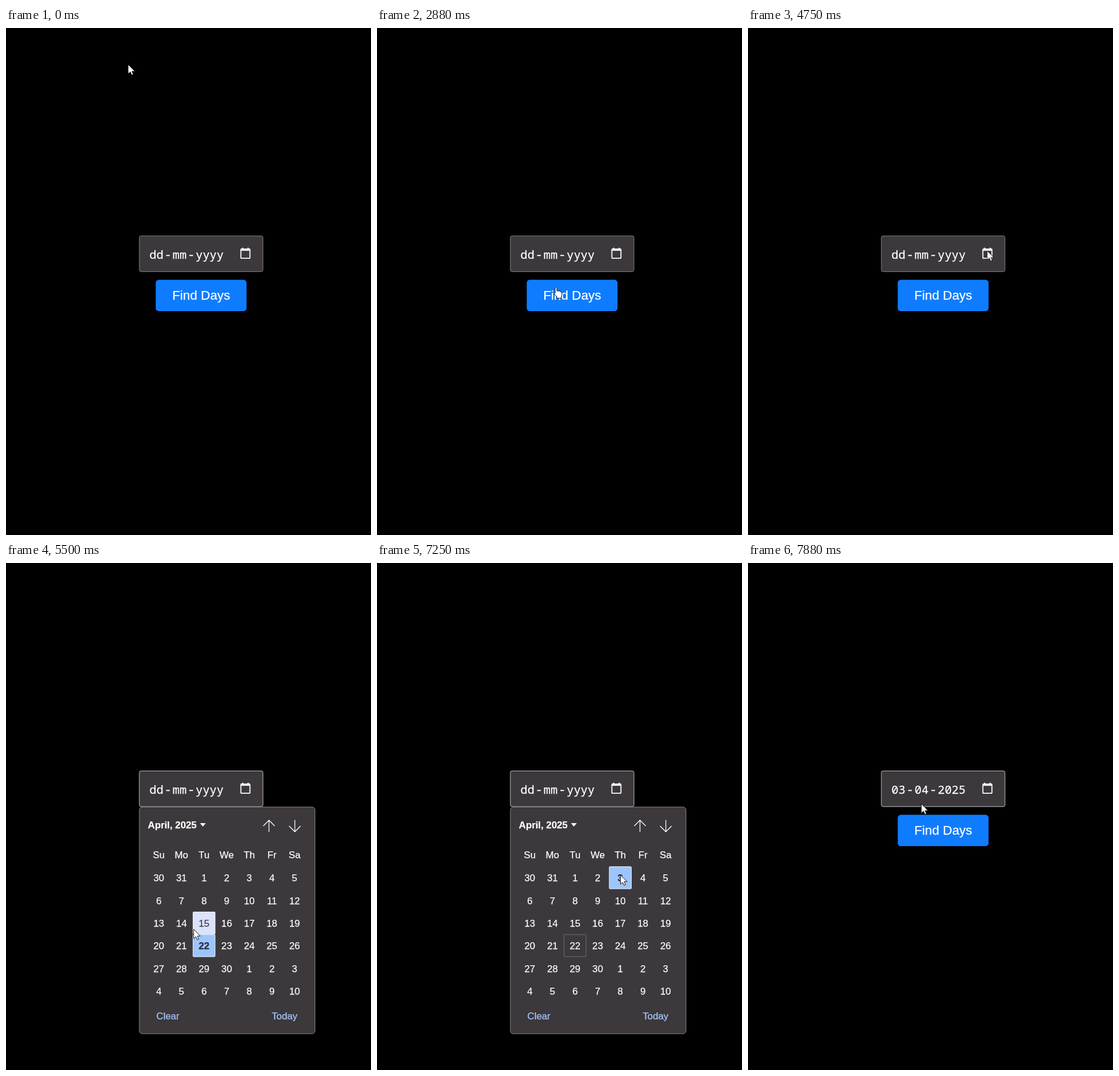
An HTML page for the animation above (8 s loop, 635 by 881 pixels).

```html
<!DOCTYPE html>
<html lang="en">
<head>
<meta charset="utf-8">
<title>Find Days</title>
<style>
  html, body { margin: 0; width: 100%; height: 100%; overflow: hidden; background: #000; }
  svg { display: block; width: 635px; height: 881px; color: #fff; }
  text {
    font: 16.8px "Liberation Sans", Arial, sans-serif;
    fill: currentColor; stroke: currentColor; stroke-width: .25;
  }
  .mid { text-anchor: middle; }
  .end { text-anchor: end; }
  .bold { font-weight: bold; }
  .big { font-size: 22.4px; }
  #date text { font: 500 20.3px "Noto Sans Mono", monospace; }
  .panel { fill: #3c383b; stroke: #858585; }
  .focus { stroke: #c4c4c4; }
  .link { color: #a6c8fd; }
  .cell rect { fill: none; }
  .today rect { stroke: #717171; }
  .hover rect { fill: #dae2fc; stroke: #fff; }
  .hover text { color: #45424d; }
  .picked rect { fill: #9dc5fd; stroke: #f4f8ff; }
  .picked text { color: #2b2a36; font-weight: bold; }
  .line { fill: none; stroke: #fff; stroke-width: 1.3; }
  #cursor path { fill: #fff; stroke: #17171a; stroke-linejoin: round; }
</style>
</head>
<body>
<svg viewBox="0 0 635 881">
  <rect id="field" x="232" y="361.3" width="215" height="62" rx="3"/>
  <g id="date"></g>
  <g class="line">
    <rect x="408.6" y="384.4" width="15.8" height="15.8" rx="1" stroke-width="1.8"/>
    <path d="M408 385.3h17" style="stroke-width:3.6"/>
    <path d="M411.8 381.8v3m9.4-3v3" style="stroke-width:2"/>
  </g>
  <rect x="260.5" y="437.5" width="158" height="54.5" rx="5.5" fill="#0f7cff"/>
  <text class="mid big" x="339.6" y="472.4">Find Days</text>

  <g id="popup">
    <rect class="panel" x="232" y="424" width="305.5" height="394" rx="5"/>
    <text class="bold" x="246.8" y="460.5">April, 2025</text>
    <path d="M337.5 452h10l-5 6z" fill="#fff"/>
    <path class="line" d="M457.5 467.5v-20.5m-10 10l10-10 10 10"/>
    <path class="line" d="M502.5 446.5v20.5m-10-10l10 10 10-10"/>
    <g id="grid"></g>
    <text class="link" x="261.6" y="793.2">Clear</text>
    <text class="link end" x="507" y="793.2">Today</text>
  </g>

  <g id="cursor">
    <path id="arrow" d="M0 0v16.2l3.8-3.5 2.5 5.5 2.6-1.2-2.4-5.3h5.1z"/>
    <path id="hand" d="M1 11V2q1.5-3 3 0v5q4-1 7 1.5t.5 8.5v2.5H4V17l-5-5q0-3 2-1z"/>
  </g>
</svg>
<script>
const LOOP = 8000, STEP = 125;
const OPEN = 5000, PICK = 7125, CLOSE = 7375;
const PITCH = 39.35, LEFT = 246.2, TOP = 527.2;
const TODAY = 23, CHOICE = 4;

// pointer moves: start, end, x, y; it rests in between
const moves = [
  [0, 0, 212.5, 63.5],
  [875, 1375, 300.5, 353],
  [1375, 1750, 309, 450],
  [3500, 4500, 416, 387],
  [5250, 5500, 326.5, 636.5],
  [5500, 6125, 345, 664],
  [6125, 6750, 423.5, 542],
  [7250, 7875, 301.5, 418.5]
];

const $ = id => document.getElementById(id);
const setClass = (node, name) => node.setAttribute("class", name);
const show = (id, on) => $(id).setAttribute("visibility", on ? "visible" : "hidden");

function add(parent, tag, attrs, content = "") {
  const node = document.createElementNS("http://www.w3.org/2000/svg", tag);
  for (const key in attrs) node.setAttribute(key, attrs[key]);
  node.textContent = content;
  return parent.appendChild(node);
}

function label(parent, col, y, content) {
  add(parent, "text", { class: "mid", x: LEFT + PITCH * (col + 0.5), y }, content);
}

let dateX = 249.6;
const dateParts = ["dd", "-", "mm", "-", "yyyy"].map(part => {
  const node = add($("date"), "text", { x: dateX, y: 401 });
  dateX += part.length * 12.2 + 1.8;
  return node;
});

["Su", "Mo", "Tu", "We", "Th", "Fr", "Sa"].forEach((name, col) => label($("grid"), col, 512.8, name));

const cells = Array.from({ length: 42 }, (_, i) => {
  const col = i % 7, y = TOP + PITCH * Math.floor(i / 7);
  const cell = add($("grid"), "g", {});
  add(cell, "rect", { x: LEFT + PITCH * col + 0.5, y: y + 0.5, width: PITCH - 1, height: PITCH - 1, rx: 1 });
  label(cell, col, y + 26, new Date(2025, 2, 30 + i).getDate());
  return cell;
});

function pointerAt(t) {
  let x = 0, y = 0;
  for (const [start, end, toX, toY] of moves) {
    if (t < start) break;
    const k = t >= end ? 1 : (t - start) / (end - start);
    x += (toX - x) * k;
    y += (toY - y) * k;
  }
  return [x, y];
}

function cellAt(x, y) {
  const col = Math.floor((x - LEFT) / PITCH), row = Math.floor((y - TOP) / PITCH);
  return col < 0 || col > 6 ? -1 : row * 7 + col;
}

function draw(time) {
  const t = Math.floor((time % LOOP) / STEP) * STEP;
  const [x, y] = pointerAt(t);
  const open = t >= OPEN && t < CLOSE;
  const onButton = !open && x > 261 && x < 418 && y > 437 && y < 492;

  $("cursor").setAttribute("transform", `translate(${x} ${y})`);
  show("arrow", !onButton);
  show("hand", onButton);
  show("popup", open);
  setClass($("field"), t >= OPEN ? "panel focus" : "panel");

  const value = t >= CLOSE ? "03 - 04 - 2025" : "dd - mm - yyyy";
  value.split(" ").forEach((part, i) => { dateParts[i].textContent = part; });

  const picked = t >= PICK ? CHOICE : TODAY, over = cellAt(x, y);
  cells.forEach((cell, i) => {
    const state = i === picked ? "picked" : i === over ? "hover" : i === TODAY ? "today" : "";
    setClass(cell, "cell " + state);
  });
}

const start = performance.now();
function tick() {
  draw(performance.now() - start);
  requestAnimationFrame(tick);
}
tick();
</script>
</body>
</html>
```
